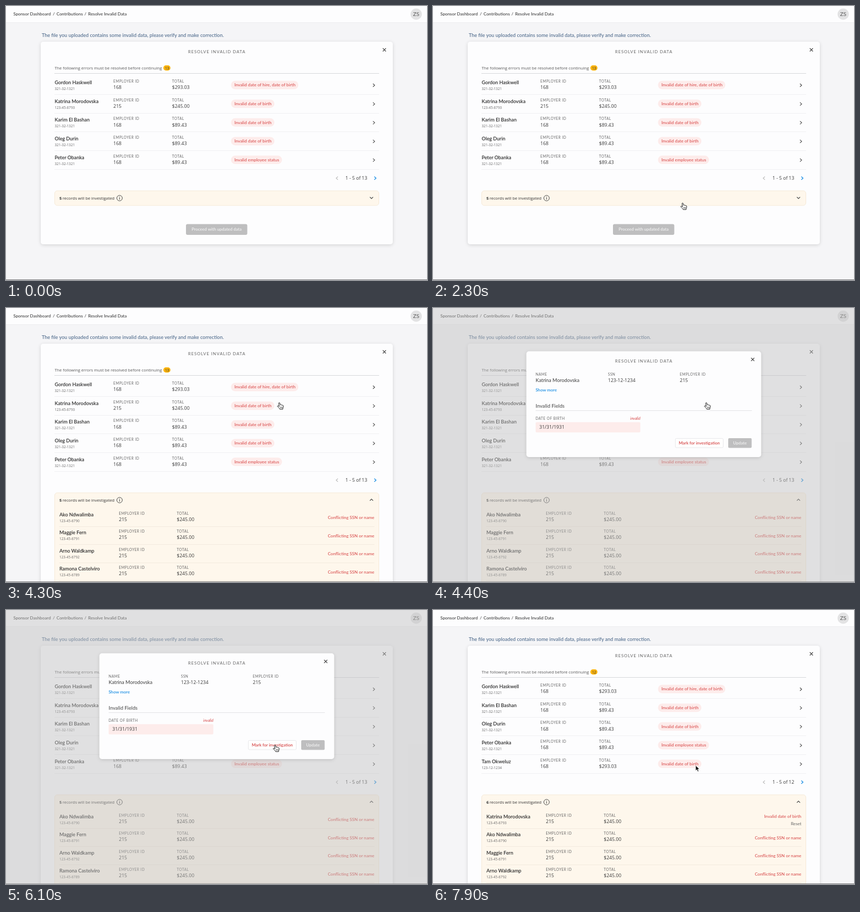
Write an HTML page that moves like this. It is 800 by 522 pixels and loops after 8 s.

```html
<!DOCTYPE html>
<html lang="en">
<head>
<meta charset="utf-8">
<title>Resolve invalid data</title>
<style>
  html, body { margin: 0; width: 100%; height: 100%; overflow: hidden; background: #f5f5f7; }
  svg { display: block; width: 800px; height: 522px; }
  text { font-family: Lato, "Open Sans", sans-serif; fill: #3a3a3a; white-space: pre; }
  .crumb { font-size: 8.25px; font-weight: 500; }
  .lead { font-size: 9.4px; font-weight: 600; fill: #5b7594; }
  .title { font-size: 8px; letter-spacing: 1px; fill: #666; }
  .name { font-size: 9.3px; font-weight: 600; fill: #2b2b2b; }
  .label { font-size: 6.7px; letter-spacing: .55px; fill: #666; }
  .num { font: 9px "Open Sans", sans-serif; }
  .ssn { font: 6.6px "Open Sans", sans-serif; fill: #666; }
  .note { font: 7.8px "Open Sans", sans-serif; fill: #555; }
  .dark { fill: #333; }
  .bold { font-weight: 700; }
  .tag { font-size: 8.25px; font-weight: 500; fill: #d94f4f; }
  .reset { font-size: 8.25px; fill: #666; }
  .button { font-size: 8px; font-weight: 600; text-anchor: middle; }
  .pale { fill: #f3f3f3; }
  .red { fill: #d64747; }
  .right { text-anchor: end; }
  .mid { text-anchor: middle; }
  .icon { fill: none; stroke: #444; stroke-width: 1.1; }
</style>
</head>
<body>
<svg id="stage" viewBox="0 0 800 522" xmlns="http://www.w3.org/2000/svg"></svg>
<script>
const LOOP = 8000;
const EXPAND = [2400, 2650];
const MODAL = [4400, 6200];

const text = (x, y, cls, str) => `<text x="${x}" y="${y}" class="${cls}">${str}</text>`;
const rect = (x, y, w, h, r, fill, more = '') =>
  `<rect x="${x}" y="${y}" width="${w}" height="${h}" rx="${r}" fill="${fill}" ${more}/>`;
// Lines sit on whole pixels so that they stay crisp.
const line = (x1, x2, y, color) =>
  `<path d="M${x1} ${Math.floor(y) + .5}H${x2}" stroke="${color}"/>`;
const icon = (x, y, d, more = '') =>
  `<path class="icon" transform="translate(${x} ${y})" d="${d}" ${more}/>`;

const RIGHT = 'M-1.6-3L1.6 0L-1.6 3';
const LEFT = 'M1.6-3L-1.6 0L1.6 3';
const DOWN = 'M-3-1.5L0 1.5L3-1.5';
const UP = 'M-3 1.5L0-1.5L3 1.5';
const CROSS = 'M-3-3L3 3M3-3L-3 3';

const BIRTH = 'Invalid date of birth';
const CONFLICT = 'Conflicting SSN or name';
const TAG_WIDTH = {
  [BIRTH]: 82.5,
  'Invalid date of hire, date of birth': 128,
  'Invalid employee status': 97
};

const person = (name, ssn, employer, total, error) => ({ name, ssn, employer, total, error });
const plain = (name, error) => person(name, '321-32-1321', 168, '$89.43', error);
const held = (name, tail) => person(name, '123-45-' + tail, 215, '$245.00', CONFLICT);

const moved = person('Katrina Morodovska', '123-45-6793', 215, '$245.00', BIRTH);
const first = person('Gordon Haskwell', '321-32-1321', 168, '$293.03',
  'Invalid date of hire, date of birth');
const middle = [
  plain('Karim El Bashan', BIRTH),
  plain('Oleg Durin', BIRTH),
  plain('Peter Obanka', 'Invalid employee status')
];
const last = person('Tam Okweluz', '123-12-1234', 168, '$293.03', BIRTH);
const waiting = [
  held('Ako Ndwalimba', 6790), held('Maggie Fern', 6791),
  held('Arno Waldkamp', 6792), held('Ramona Castelviro', 6789)
];

function fields(p, y, cols) {
  return text(cols[0], y, 'name', p.name) + text(cols[0], y + 11, 'ssn', p.ssn) +
    text(cols[1], y - 3, 'label', 'EMPLOYER ID') + text(cols[1], y + 9.4, 'num', p.employer) +
    text(cols[2], y - 3, 'label', 'TOTAL') + text(cols[2], y + 9.4, 'num', p.total);
}

function errorRow(p, i) {
  const y = 149 + i * 35.65;
  return fields(p, y, [92.5, 204, 315.5]) +
    rect(427.5, y - 6.5, TAG_WIDTH[p.error], 16, 8, '#fdeceb') +
    text(434, y + 4.3, 'tag', p.error) +
    icon(699, y + 2, RIGHT) + line(92, 709, y + 19.6, '#f0f0f2');
}

function heldRow(p, i) {
  const y = 396.5 + i * 34.5;
  const status = p === moved
    ? text(700, y - .3, 'tag right', p.error) + text(700, y + 13.8, 'reset right', 'Reset')
    : text(700, y + 5.5, 'tag right', p.error);
  return fields(p, y, [101.5, 214.5, 324.5]) + status + line(101, 700, y + 19.5, '#f3eade');
}

function list(id, errors, records, count, total) {
  return `<g id="${id}">` +
    text(306, 120.6, 'note dark mid', `<tspan font-size="7">${count}</tspan>`) +
    errors.map(errorRow).join('') +
    text(645, 331.2, 'num', `1 - 5 of ${count}`) +
    text(101.5, 369, 'note dark bold', total) +
    `<g clip-path="url(#fold)">${records.map(heldRow).join('')}</g></g>`;
}

const page =
  rect(0, 0, 800, 522, 0, '#f5f5f7') +
  rect(0, 0, 800, 31, 0, '#fdfdfe') + line(0, 800, 31, '#eeeef0') +
  text(14, 18.3, 'crumb', 'Sponsor Dashboard') + text(89, 18.3, 'crumb', '/') +
  text(96, 18.3, 'crumb', 'Contributions') + text(149, 18.3, 'crumb', '/') +
  text(156, 18.3, 'crumb', 'Resolve Invalid Data') +
  '<circle cx="779.5" cy="15.5" r="10.7" fill="#e3e3e4"/>' +
  '<text x="779.5" y="19.2" class="mid" font-size="10.4" style="fill:#555">ZS</text>' +
  text(68, 59.4, 'lead',
    'The file you uploaded contains some invalid data, please verify and make correction.') +
  rect(66, 68, 669, 386, 5, '#fdfdfe', 'id="card" filter="url(#soft)"') +
  text(346, 89.5, 'title', 'RESOLVE INVALID DATA') + icon(719, 83.5, CROSS) +
  text(92.5, 120.8, 'note', 'The following errors must be resolved before continuing') +
  rect(299, 113, 13.5, 10, 5, '#fbb40f') +
  line(92, 709, 128, '#d5d6d9') +
  icon(629, 328, LEFT, 'style="stroke:#b9b9b9"') +
  icon(701.5, 328, RIGHT, 'style="stroke:#1c8fe3;stroke-width:1.4"') +
  rect(92.5, 352, 616, 28, 5, '#fef7ec', 'id="panel" stroke="#f6ead8"') +
  text(107.5, 369, 'note dark', 'records will be investigated') +
  '<circle cx="215.8" cy="366" r="5.2" class="icon" style="stroke-width:1"/>' +
  icon(215.8, 366, 'M0-.7V2.7M0-2.7V-1.5') +
  icon(694.5, 365.5, DOWN, 'id="chevron"') +
  list('before', [first, moved, ...middle], waiting, 13, 5) +
  list('after', [first, ...middle, last], [moved, ...waiting.slice(0, 3)], 12, 6) +
  '<g id="proceed">' + rect(342, 415.5, 116.5, 20.5, 3, '#bebebf') +
  text(400.2, 428.4, 'button pale', 'Proceed with updated data') + '</g>' +
  line(0, 800, 521, '#77777a');

const modal = '<g id="modal">' +
  rect(0, 0, 800, 522, 0, '#bdbdbd', 'fill-opacity=".46"') +
  rect(177.5, 82.5, 446, 201.5, 5, '#fdfdfe', 'filter="url(#soft)"') +
  text(346, 104, 'title', 'RESOLVE INVALID DATA') + icon(607.5, 98, CROSS) +
  text(195, 128.6, 'label', 'NAME') + text(332.5, 128.6, 'label', 'SSN') +
  text(469, 128.6, 'label', 'EMPLOYER ID') +
  `<text x="195" y="141" font-size="9.4">${moved.name}</text>` +
  text(332.5, 141, 'num', '123-12-1234') + text(469, 141, 'num', '215') +
  '<text x="195" y="159.4" font-size="8.1" font-weight="600" style="fill:#1c8fe3">Show more</text>' +
  '<text x="195" y="190" font-size="9.6" font-weight="600" style="fill:#606060">Invalid Fields</text>' +
  line(195, 606, 195, '#e2e2e5') +
  text(195, 213, 'label', 'DATE OF BIRTH') +
  '<text x="394" y="213" class="right red" font-size="7.1" font-style="italic">invalid</text>' +
  rect(195, 217.5, 199, 19.5, 2, '#fdeceb') + text(202, 230.4, 'num', '31/31/1931') +
  rect(460.5, 248.5, 91, 17.5, 2, '#fefefe', 'stroke="#e8e8ea"') +
  text(506, 260, 'button red', 'Mark for investigation') +
  rect(561, 248, 44.5, 18.5, 2, '#bebebf') +
  text(583.2, 260, 'button pale', 'Update') + '</g>';

// Both pointers have their tip at the origin.
const pointers =
  '<g id="pointer" stroke-linejoin="round">' +
  '<path id="arrow" d="M0 0V10.3L2.4 8.1L4.1 12L6 11.2L4.3 7.4H7.5Z" fill="#111" stroke="#fff" stroke-width=".8"/>' +
  '<g id="hand"><path d="M-1.3 1Q-.2-.6 .9 1L1.8 4.6Q3 3.7 3.8 4.9Q5 4.2 5.6 5.3Q7.3 5 7.5 6.7' +
  'Q7.8 9 6.7 10.6L6.5 12.8H.8L.3 11.4Q-1.6 9.6-3.7 7.4Q-3.7 5.8-2 6.4L-.3 7.5Z" ' +
  'fill="#fff" stroke="#111" stroke-width="1"/>' +
  '<path d="M2 8V11M3.7 8V11M5.3 8V11" stroke="#111" stroke-width=".6"/></g></g>';

const defs = '<defs><filter id="soft" x="-10%" y="-10%" width="120%" height="125%">' +
  '<feDropShadow dx="0" dy="1.5" stdDeviation="3" flood-color="#000" flood-opacity=".14"/></filter>' +
  '<clipPath id="fold"><rect id="foldBox" x="92" y="380" width="617" height="0"/></clipPath></defs>';

document.getElementById('stage').innerHTML = defs + page + modal + pointers;

const $ = id => document.getElementById(id);
const show = (id, on) => $(id).setAttribute('visibility', on ? 'visible' : 'hidden');
const set = (id, name, value) => $(id).setAttribute(name, value);
const ease = k => k * k * (3 - 2 * k);
const progress = (t, a, b) => ease(Math.min(1, Math.max(0, (t - a) / (b - a))));

// time, x, y
const track = [
  [1000, 486, 388], [1700, 474.5, 375], [2900, 474.5, 375], [4000, 519.5, 180],
  [4800, 519.5, 180], [5800, 511.5, 257], [6500, 511.5, 257], [7300, 499, 296], [LOOP, 499, 296]
];

function pointerAt(t) {
  const i = Math.max(1, track.findIndex(p => p[0] > t));
  const [a, b] = [track[i - 1], track[i]];
  const k = progress(t, a[0], b[0]);
  return [a[1] + (b[1] - a[1]) * k, a[2] + (b[2] - a[2]) * k];
}

function overLink(t, y) {
  if (t >= MODAL[1]) return t < 6550;
  if (t >= MODAL[0]) return y < 181 || y > 248;
  return (y > 352 && y < 380) || (y > 130 && y < 311);
}

function draw(t) {
  const open = progress(t, ...EXPAND);
  const grow = open * 207;
  set('card', 'height', 386 + grow);
  set('panel', 'height', 28 + grow);
  set('foldBox', 'height', grow);
  set('proceed', 'transform', `translate(0 ${grow})`);
  set('chevron', 'd', t < EXPAND[0] ? DOWN : UP);

  show('before', t < MODAL[1]);
  show('after', t >= MODAL[1]);
  show('modal', t >= MODAL[0] && t < MODAL[1]);

  const [x, y] = pointerAt(t);
  const seen = t >= track[0][0];
  const link = overLink(t, y);
  set('pointer', 'transform', `translate(${x} ${y})`);
  show('hand', seen && link);
  show('arrow', seen && !link);
}

const start = performance.now();
function tick() {
  draw((performance.now() - start) % LOOP);
  requestAnimationFrame(tick);
}
tick();
</script>
</body>
</html>
```
